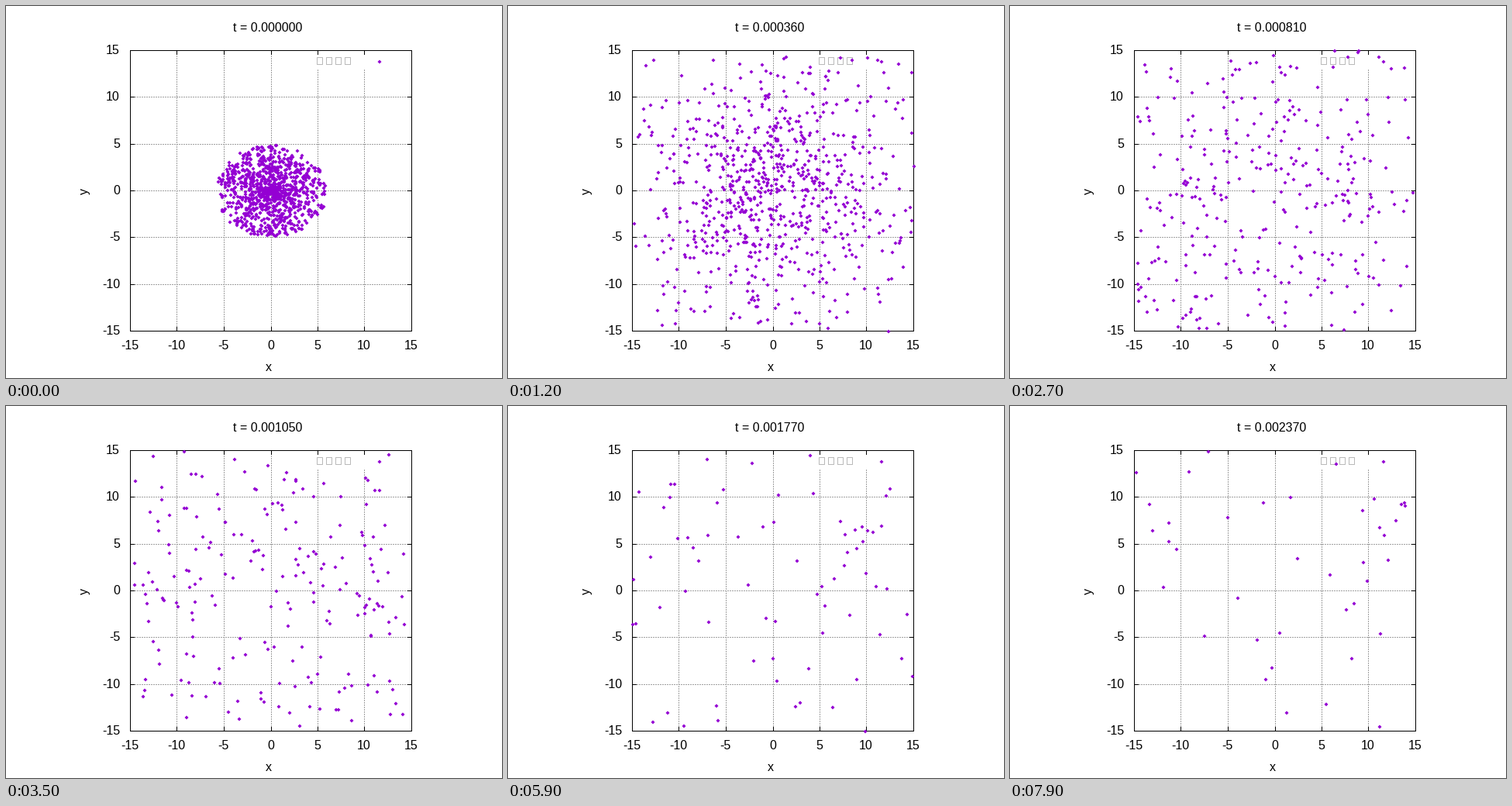
A matplotlib script for the animation above (8 s loop, 640 by 480 pixels).

```python
import numpy as np
import matplotlib.pyplot as plt
from matplotlib.animation import FuncAnimation
from matplotlib.patches import Rectangle

FRAMES, INTERVAL = 80, 100
DT = 3e-5
COUNT = 1000
LIMIT = 15
RADII = 5.9, 4.95  # half-axes of the starting cloud
SPEED = 1.05       # median drift per frame
DELAY = 4          # frames needed to pick up speed
PX = 0.72          # one pixel in points at 100 dpi
LEFT, RIGHT, TOP, BOTTOM = 160, 523, 57, 419
VIOLET, GREY = "#9400d3", "#a0a0a0"

plt.rcParams["font.family"] = "Liberation Sans"
plt.rcParams["font.size"] = 16 * PX


def to_px(x, y):
    px = LEFT + (x + LIMIT) * (RIGHT - LEFT) / (2 * LIMIT)
    py = BOTTOM - (y + LIMIT) * (BOTTOM - TOP) / (2 * LIMIT)
    return np.round(px), np.round(py)


def travel(n):
    """Distance factor: the cloud starts at rest and soon coasts."""
    return n - DELAY * (1 - np.exp(-n / DELAY))


def polar(rng, radius):
    angle = rng.uniform(0, 2 * np.pi, len(radius))
    return np.column_stack([radius * np.cos(angle), radius * np.sin(angle)])


def make_cloud():
    """Dense-centred ellipse with heavy-tailed speeds in all directions."""
    rng = np.random.default_rng(11)
    start = polar(rng, rng.random(COUNT) ** 0.8) * RADII
    u = rng.random(COUNT)
    return start, polar(rng, SPEED * np.sqrt(u / (1 - u)))


start, speed = make_cloud()

fig = plt.figure(figsize=(6.4, 4.8), dpi=100, facecolor="white")
ax = fig.add_axes([0, 0, 1, 1])
ax.set_xlim(0, 640)
ax.set_ylim(480, 0)
ax.axis("off")


def line(xs, ys, color="black", **style):
    ax.plot(xs, ys, color=color, lw=PX, solid_capstyle="butt",
            antialiased=False, snap=True, **style)


def label(x, y, text, ha="center", **style):
    return ax.text(x, y, text, ha=ha, va="baseline", color="black", **style)


def draw_frame():
    tick = 5
    dots = dict(color=GREY, dashes=(2, 2), zorder=1)
    for value in range(-LIMIT, LIMIT + 1, 5):
        x, y = to_px(value, value)
        if abs(value) < LIMIT:
            grid_top = 82 if value in (5, 10) else TOP  # gap for the legend
            line([x, x], [BOTTOM, grid_top], **dots)
            line([LEFT, RIGHT], [y, y], **dots)
            for edge, step in ((TOP, tick), (BOTTOM, -tick)):
                line([x, x], [edge, edge + step])
            for edge, step in ((LEFT, tick), (RIGHT, -tick)):
                line([edge, edge + step], [y, y])
        label(x - 0.5, 443, str(value))
        label(147, y + 5, str(value), ha="right")
    line([LEFT, RIGHT, RIGHT, LEFT, LEFT], [TOP, TOP, BOTTOM, BOTTOM, TOP])
    label(339, 471, "x")
    label(106, 239, "y", rotation=90, rotation_mode="anchor")


def draw_legend():
    for i in range(4):
        ax.add_patch(Rectangle((401 + 12 * i, 66), 7, 9, fill=False,
                               ec="#8c8c8c", lw=0.6 * PX))


# Five-pixel diamond centred on a pixel rather than on a pixel corner.
DIAMOND = [(3, -0.5), (0.5, 2), (-2, -0.5), (0.5, -3), (3, -0.5)]

draw_frame()
draw_legend()
marker = dict(ls="", marker=DIAMOND, ms=6 * PX, mew=0, color=VIOLET,
              antialiased=False, clip_on=False, zorder=4)
ax.plot([481], [71], **marker)
cloud, = ax.plot([], [], **marker)
title = label(293, 33, "", ha="left")


def update(n):
    pos = start + speed * travel(n)
    x, y = pos[np.abs(pos).max(axis=1) <= LIMIT].T
    cloud.set_data(*to_px(x, y))
    title.set_text(f"t = {n * DT:.6f}")
    return cloud, title


anim = FuncAnimation(fig, update, frames=FRAMES, interval=INTERVAL,
                     repeat=True, repeat_delay=0, blit=False)
plt.show()
```
